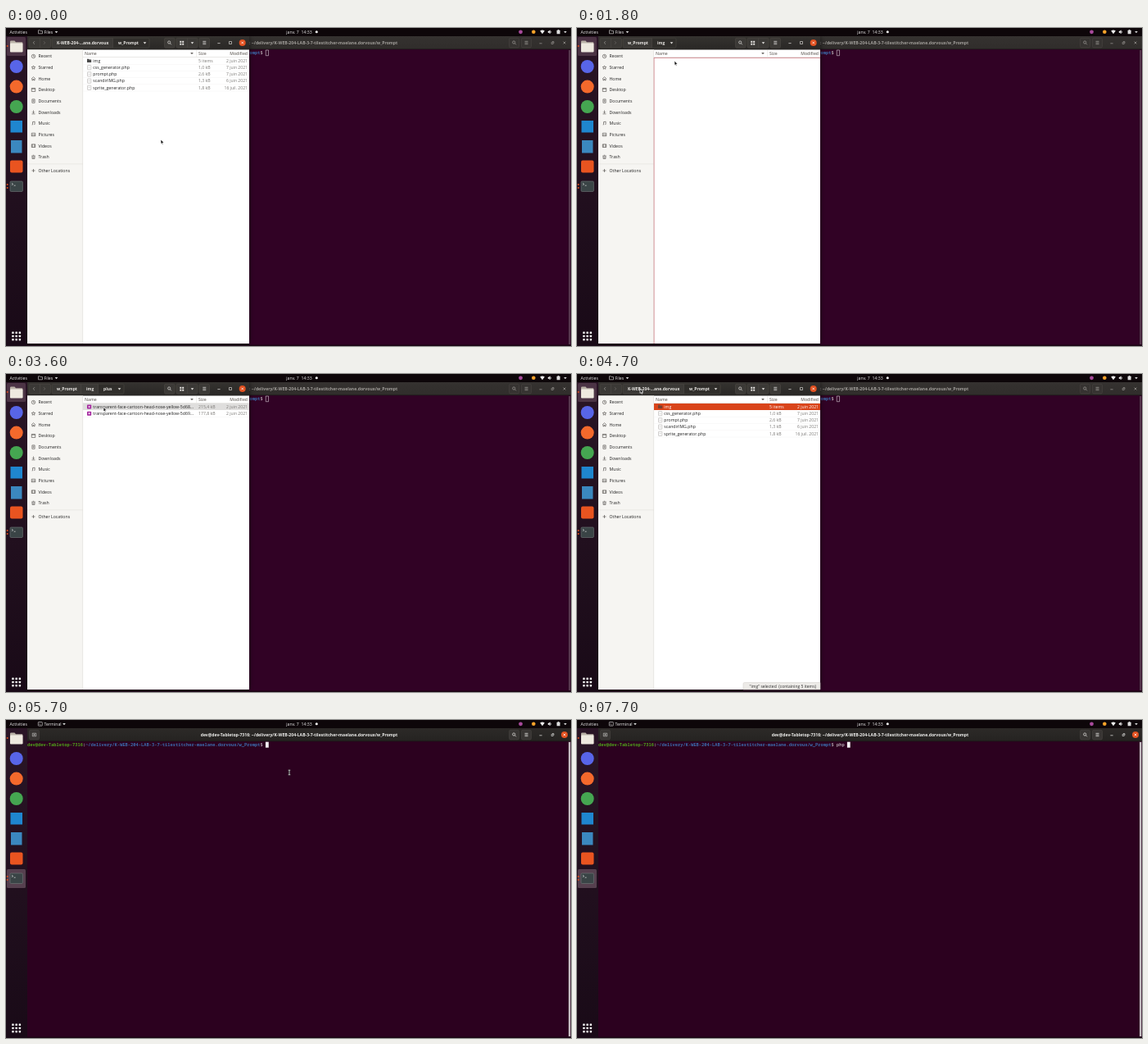
These frames come from a looping animation (690x388 px, 8 s). An HTML page with a canvas:

```html
<!DOCTYPE html>
<html lang="en">
<head>
<meta charset="utf-8">
<title>Desktop session</title>
<style>
  html, body { margin: 0; width: 100%; height: 100%; overflow: hidden; background: #000; }
  canvas { display: block; width: 690px; height: 388px; }
</style>
</head>
<body>
<canvas id="stage" width="690" height="388"></canvas>
<script>
const ctx = document.getElementById('stage').getContext('2d');
const LOOP = 8000, STEP = 100;
const UI = '"Open Sans", "Noto Sans", sans-serif';
const MONO = '"Noto Sans Mono", "DejaVu Sans Mono", monospace';
const CELL = 3.233;
const ORANGE = '#e2501f';

const HOST = 'dev@dev-Tabletop-7316';
const PATH = '~/delivery/K-WEB-204-LAB-3-7-tilestitcher-maelane.dorvoux/w_Prompt';

const VIEWS = {
  root: {
    crumbs: [['K-WEB-204-...ane.dorvoux', 62], ['w_Prompt', 137]], end: 175,
    rows: [
      ['dir', 'img', '5 items', '2 juin 2021'],
      ['doc', 'css_generator.php', '1,0 kB', '7 juin 2021'],
      ['doc', 'prompt.php', '2,6 kB', '7 juin 2021'],
      ['doc', 'scandirIMG.php', '1,3 kB', '6 juin 2021'],
      ['doc', 'sprite_generator.php', '1,8 kB', '16 juil. 2021']
    ]
  },
  img: {
    crumbs: [['w_Prompt', 62], ['img', 98]], end: 121,
    rows: [
      ['dir', 'plus', '2 items', '2 juin 2021'],
      ['pic', 'face-blue.png', '84,2 kB', '2 juin 2021'],
      ['pic', 'face-green.png', '91,6 kB', '2 juin 2021'],
      ['pic', 'face-red.png', '77,3 kB', '2 juin 2021'],
      ['pic', 'face-yellow.png', '102,5 kB', '2 juin 2021']
    ]
  },
  plus: {
    crumbs: [['w_Prompt', 62], ['img', 98], ['plus', 119]], end: 144,
    rows: [
      ['pic', 'transparent-face-cartoon-head-nose-yellow-5d68...', '215,4 kB', '2 juin 2021'],
      ['pic', 'transparent-face-cartoon-head-nose-yellow-5d69...', '177,8 kB', '2 juin 2021']
    ]
  }
};

// start time, view, state of the first row
const SCENES = [
  [0, 'root', ''], [900, 'root', 'hover'], [1600, 'root', 'selected'],
  [1800, 'img', 'empty'], [1900, 'img', ''], [2200, 'img', 'hover'], [2500, 'img', 'selected'],
  [2700, 'plus', 'empty'], [2800, 'plus', ''], [3600, 'plus', 'hover'], [3800, 'plus', ''],
  [4400, 'root', 'empty'], [4500, 'root', 'selected']
];

// time, x, y of the pointer
const POINTER = [
  [700, 189, 136], [800, 160, 84], [900, 124.5, 31.5], [1400, 119, 40], [3600, 119, 40.5],
  [4000, 77, 18], [4900, 77, 18], [5500, 346, 64]
];

function rect(x, y, w, h, fill) {
  ctx.fillStyle = fill;
  ctx.fillRect(x, y, w, h);
}

function box(x, y, w, h, r, fill, stroke) {
  ctx.beginPath();
  ctx.roundRect(x, y, w, h, r);
  if (fill) { ctx.fillStyle = fill; ctx.fill(); }
  if (stroke) { ctx.strokeStyle = stroke; ctx.lineWidth = 0.6; ctx.stroke(); }
}

function disc(x, y, r, fill) {
  ctx.beginPath();
  ctx.arc(x, y, r, 0, 7);
  ctx.fillStyle = fill;
  ctx.fill();
}

function draw(d, x, y, color, width = 0.7, fill) {
  const p = new Path2D(d);
  ctx.save();
  ctx.translate(x, y);
  ctx.lineWidth = width;
  ctx.strokeStyle = color;
  if (fill) { ctx.fillStyle = fill; ctx.fill(p); }
  if (width) ctx.stroke(p);
  ctx.restore();
}

// Large font under a small scale keeps fractional advances.
function text(s, x, y, color, size = 5.2, weight = 500, align = 'left', family = UI) {
  ctx.save();
  ctx.translate(x, y);
  ctx.scale(0.1, 0.1);
  ctx.font = `${weight} ${size * 10}px ${family}`;
  ctx.textAlign = align;
  ctx.fillStyle = color;
  ctx.fillText(s, 0, 0);
  ctx.restore();
}

const mono = (s, col, color, weight = 700) =>
  text(s, 26 + col * CELL, 32.2, color, CELL / 0.6, weight, 'left', MONO);

const arrowDown = (x, y, color) => draw('M-1.8-1H1.8L0 1.2Z', x, y, color, 0, color);

function fade(y0, y1, a, b) {
  const g = ctx.createLinearGradient(0, y0, 0, y1);
  g.addColorStop(0, a);
  g.addColorStop(1, b);
  return g;
}

const ICON = {
  search: 'M1.1-.5A1.6 1.6 0 1 1-2.1-.5A1.6 1.6 0 1 1 1.1-.5M.7.7L2.2 2.3',
  menu: 'M-2-1.7H2M-2 0H2M-2 1.7H2',
  cross: 'M-1.4-1.4L1.4 1.4M1.4-1.4L-1.4 1.4',
  min: 'M-1.6 1.2H1.6',
  max: 'M-1.5-1.5H1.5V1.5H-1.5Z',
  restore: 'M-1.4-.6H.7V1.5H-1.4ZM-.5-1.4H1.5V.6'
};

const PLACES = [
  ['Recent', 'M2.2 0A2.2 2.2 0 1 1-2.2 0A2.2 2.2 0 1 1 2.2 0M0-1.3V.2H1.2'],
  ['Starred', 'M0-2.2L.7-.7 2.3-.6 1 .5 1.5 2 0 1.2-1.5 2-1 .5-2.3-.6-.7-.7Z'],
  ['Home', 'M-2.4.1L0-2.1 2.4.1M-1.6 0V2H-.5V.7H.5V2H1.6V0'],
  ['Desktop', 'M-2.2-2H2.2V2H-2.2ZM-2.2-1.2H2.2'],
  ['Documents', 'M-1.6-2.2H1.6V2.2H-1.6ZM-.8-.8H.8M-.8.4H.8'],
  ['Downloads', 'M0-2.2V1M-1.4-.4L0 1 1.4-.4M-2 2.1H2'],
  ['Music', 'M-1 1.5V-1.8L1.6-2.2V1.1M-1.8 1.6H-1M.8 1.2H1.6'],
  ['Pictures', 'M-2.2-1.8H2.2V1.8H-2.2ZM-2 1.4L-.6-.3.4.7 1.2 0 2 1.2'],
  ['Videos', 'M-2.2-1.8H2.2V1.8H-2.2ZM-1.3-1.8V1.8M1.3-1.8V1.8'],
  ['Trash', 'M-1.5-1.1V2.1H1.5V-1.1M-2.2-1.3H2.2M-.7-2.1H.7M-.5 0V1.2M.5 0V1.2']
];

function topBar(active) {
  rect(0, 0, 690, 10, '#0d0609');
  text('Activities', 4.5, 6.8, '#eee');
  if (active) {
    box(39.3, 2.5, 5, 4.6, 0.6, null, '#ddd');
    draw('M-1-1L0 0-1 1M.5 1H1.5', 41.4, 4.9, '#ddd', 0.5);
    text('Terminal', 46.5, 6.8, '#eee');
    arrowDown(71, 5, '#ddd');
  } else {
    draw('M0 0H2L2.6.8H5V4H0Z', 39.5, 2.8, '#ddd', 0.6);
    text('Files', 46.5, 6.8, '#eee');
    arrowDown(61.5, 5, '#ddd');
  }
  text('janv. 7  14:33', 358, 6.8, '#eee', 5.2, 500, 'center');
  disc(379.3, 4.8, 1.5, '#fff');
  disc(628.5, 4.8, 2.4, '#a84a9c');
  disc(644.3, 4.8, 2.3, '#f5a32a');
  draw('M-2.8-1.4Q0-3.4 2.8-1.4L0 2.2Z', 655, 5, '#eee', 0, '#eee');
  draw('M-2-.7H-1L.3-2V2L-1 .7H-2ZM1.2-1.2Q2 0 1.2 1.2', 664, 4.8, '#eee', 0.5, '#eee');
  box(672.6, 2.7, 4, 4.6, 0.5, '#ddd');
  rect(673.8, 1.9, 1.6, 1, '#ddd');
  arrowDown(683, 5, '#ddd');
}

function dock(active) {
  rect(0, 10, 26, 378, fade(10, 388, '#2a1526', '#190a17'));
  box(1, active ? 182 : 11, 23, 23, 1.5, active ? '#56404f' : '#4c3445');
  draw('M0 1.2Q0 0 1.2 0H5.5L7 1.8H14.4Q15.4 1.8 15.4 3V13.4H0Z', 5, 15.5, '#000', 0, '#b9b1a6');
  box(5, 18.6, 15.4, 11, 1, '#eee9df');
  disc(12.7, 47, 8, '#5865e8');
  disc(12.7, 71.6, 8, '#f4692c');
  disc(12.7, 96, 8, '#45a651');
  rect(5.5, 113, 14.5, 14.5, '#1f86cf');
  rect(6, 137, 13.5, 15.5, '#3b88bf');
  box(5, 161.5, 15.5, 15, 2, '#e95420');
  box(5, 187, 15.4, 12.5, 1.2, '#3a4446', '#717a7a');
  draw('M0 0L1.6 1.2 0 2.4M2.6 2.9H4.6', 7, 189.3, '#e4e4e4', 0.7);
  for (const y of [22, 191, 195]) disc(1.7, y, 1, ORANGE);
  for (let i = 0; i < 9; i++)
    box(7.2 + i % 3 * 4.2, 370.5 + (i / 3 | 0) * 4.2, 2.5, 2.5, 0.6, '#eee');
}

function terminal(active, t) {
  const ink = active ? '#efefed' : '#a19e9a';
  rect(26, 10, 664, 378, active ? '#2c011f' : '#310225');
  rect(26, 10, 664, 16, fade(10, 26, active ? '#2d2a28' : '#353230', active ? '#252321' : '#302d2b'));
  rect(26, 25.5, 664, 0.7, '#191514');
  text(`${HOST}: ${PATH}`, 358, 19.9, ink, 5.1, 700, 'center');
  for (const x of [28.5, 614.5, 629.5])
    box(x, 12.3, 12, 11.6, 1.5, active ? '#383533' : '#363331', '#484542');
  draw('M-2.2-1.8H2.2V1.8H-2.2ZM0-1V1M-1 0H1', 34.5, 18, ink, 0.5);
  draw(ICON.search, 620.7, 18, ink);
  draw(ICON.menu, 635.5, 18, ink);
  draw(ICON.min, 653, 17.6, ink);
  draw(ICON.restore, 667.5, 18, ink, 0.6);
  if (active) disc(682, 18, 4, ORANGE);
  draw(ICON.cross, 682, 18, active ? '#fff' : ink);

  mono(HOST, 0, '#4fa51a');
  mono(':', 21, '#ddd');
  mono(PATH, 22, '#3c6cab');
  mono('$', 88, '#ddd', 400);
  const typed = 'php '.slice(0, Math.max(0, Math.floor((t - 7200) / STEP)));
  mono(typed, 90, '#eee', 400);
  const x = 26 + (90 + typed.length) * CELL;
  const lit = typed || Math.floor((t - 5700) / 600) % 2 === 0;
  if (!active) box(x + 0.3, 27, 3.3, 6.7, 0, null, '#d8d0d5');
  else if (lit) rect(x, 26.7, 3.8, 7, '#f4f1f3');

  rect(686.5, 26, 3.5, 362, active ? '#3a1a30' : '#280620');
  rect(687.2, 27, 2, 359, active ? '#d3ccd0' : '#5b3b52');
  rect(26, 386.5, 664, 1.5, '#1b0615');
}

function fileIcon(kind, y, selected) {
  if (kind === 'dir') {
    draw('M0 0H2L2.7.8H5.2V4.4H0Z', 99, y - 2.3, '#000', 0, selected ? '#7a4030' : '#4b4b4b');
  } else if (kind === 'pic') {
    box(99, y - 2.5, 5.2, 5, 0.7, '#a52aa0');
    disc(101.6, y, 1.1, '#f3d7f1');
  } else {
    box(99.5, y - 2.6, 4.4, 5.2, 0.4, '#fafafa', '#b5b3b0');
    rect(100.5, y - 0.3, 2.4, 0.5, '#c4c2c0');
  }
}

function fileList({ rows }, state) {
  rows.forEach(([kind, name, size, date], i) => {
    const y = 40 + i * 8.2, selected = !i && state === 'selected';
    if (selected) rect(94, 36, 203, 8, '#d9441a');
    else if (!i && state === 'hover') rect(94, 36, 203, 8, '#dfdedd');
    else rect(94, y + 4, 203, 0.4, '#f1f0ef');
    fileIcon(kind, y, selected);
    const soft = selected ? '#fff' : '#7b7976';
    text(name, 106.3, y + 1.8, selected ? '#fff' : '#222');
    text(size, 235, y + 1.8, soft);
    text(date, 295, y + 1.8, soft, 5.1, 500, 'right');
  });
}

function fileManager(t) {
  const [, name, state] = SCENES.filter(s => s[0] <= t).pop();
  const view = VIEWS[name], ink = '#e9e7e4';

  ctx.save();
  ctx.shadowColor = 'rgba(0,0,0,.55)';
  ctx.shadowBlur = 6;
  rect(26, 10, 271, 375, '#fff');
  ctx.restore();
  rect(26, 385, 271, 3, '#1b0716');
  rect(26, 10, 271, 16.5, fade(10, 26, '#353330', '#292725'));

  for (const [x, w] of [[28, 26.5], [56, view.end - 56], [193.5, 12.5], [208, 26], [236, 12.5]])
    box(x, 12.3, w, 11.8, 1.5, '#3b3936', '#4d4a46');
  const last = view.crumbs.at(-1)[1] - 6.5;
  if (t >= 4300 && t < 4400) rect(56.5, 12.6, 35, 11.2, '#24221f');
  rect(last, 12.6, view.end - last - 0.5, 11.2, '#302e2b');
  view.crumbs.forEach(([label, x], i) => {
    if (i) rect(x - 6.6, 12.5, 0.6, 11.4, '#4d4a46');
    text(label, x, 19.9, ink, 5, 700);
  });
  arrowDown(view.end - 5.5, 18.2, ink);
  draw('M1-1.8L-.8 0 1 1.8', 34, 18, '#a3a09b');
  draw('M-1-1.8L.8 0-1 1.8', 47, 18, '#6e6b67');
  rect(41, 12.5, 0.6, 11.4, '#4d4a46');
  draw(ICON.search, 199.7, 18, ink);
  for (const x of [212.3, 215.2]) for (const y of [15.8, 18.7]) rect(x, y, 2, 2, ink);
  rect(221.5, 12.5, 0.6, 11.4, '#4d4a46');
  arrowDown(227.5, 18.2, ink);
  draw(ICON.menu, 242.3, 18, ink);
  draw(ICON.min, 260, 17.4, ink);
  draw(ICON.max, 274, 18, ink, 0.6);
  disc(288.7, 18, 4, ORANGE);
  draw(ICON.cross, 288.7, 18, '#fff');

  rect(26, 26.5, 68, 358.5, '#f6f5f2');
  rect(93.5, 26.5, 0.6, 358.5, '#dedbd7');
  PLACES.forEach(([label, icon], i) => {
    const y = 34.5 + i * 13.65;
    draw(icon, 33.5, y, '#45423f', 0.6);
    text(label, 39.5, y + 1.8, '#222');
  });
  rect(26, 165.7, 68, 0.5, '#dcd9d5');
  draw('M-2 0H2M0-2V2', 33.5, 174, '#45423f', 0.6);
  text('Other Locations', 39.5, 175.9, '#222');

  rect(94, 35.3, 203, 0.6, '#dad8d5');
  text('Name', 96, 32.7, '#77736f', 5.1, 600);
  arrowDown(227, 31, '#66625e');
  text('Size', 235, 32.7, '#77736f', 5.1, 600);
  text('Modified', 295, 32.7, '#77736f', 5.1, 600, 'right');
  rect(232, 27, 0.5, 8, '#e2e0dd');

  if (state === 'empty') {
    rect(94, 36, 203, 0.8, '#cf8088');
    rect(93.7, 36, 0.8, 349, '#cf8088');
  } else {
    fileList(view, state);
  }
  if (t >= 4600) {
    box(203, 376.5, 94, 8.5, [1.5, 0, 0, 0], '#edebe8', '#d5d2ce');
    text('"img" selected  (containing 5 items)', 292, 382.6, '#333', 5, 500, 'right');
  }
}

function pointer(t) {
  let i = POINTER.findIndex(p => p[0] > t);
  if (i < 0) i = POINTER.length;
  const a = POINTER[Math.max(0, i - 1)], b = POINTER[Math.min(i, POINTER.length - 1)];
  const k = b[0] > a[0] ? (t - a[0]) / (b[0] - a[0]) : 0;
  const x = a[1] + (b[1] - a[1]) * k, y = a[2] + (b[2] - a[2]) * k;
  if (x > 297) {
    const beam = 'M-1.3-2.8H1.3M0-2.8V2.8M-1.3 2.8H1.3';
    draw(beam, x, y, '#111', 1.6);
    draw(beam, x, y, '#e8e4e6', 0.8);
  } else {
    draw('M0 0V5.4L1.2 4.4 2 6.2 3 5.8 2.2 4H4Z', x, y, '#fff', 0.7, '#111');
  }
}

function frame(now) {
  const t = Math.floor(now % LOOP / STEP) * STEP;
  const active = t >= 5700;
  terminal(active, t);
  if (!active) fileManager(t);
  dock(active);
  topBar(active);
  if (t < 7300) pointer(t);
}

let start;
function tick(now) {
  start ??= now;
  frame(now - start);
  requestAnimationFrame(tick);
}
requestAnimationFrame(tick);
</script>
</body>
</html>
```
